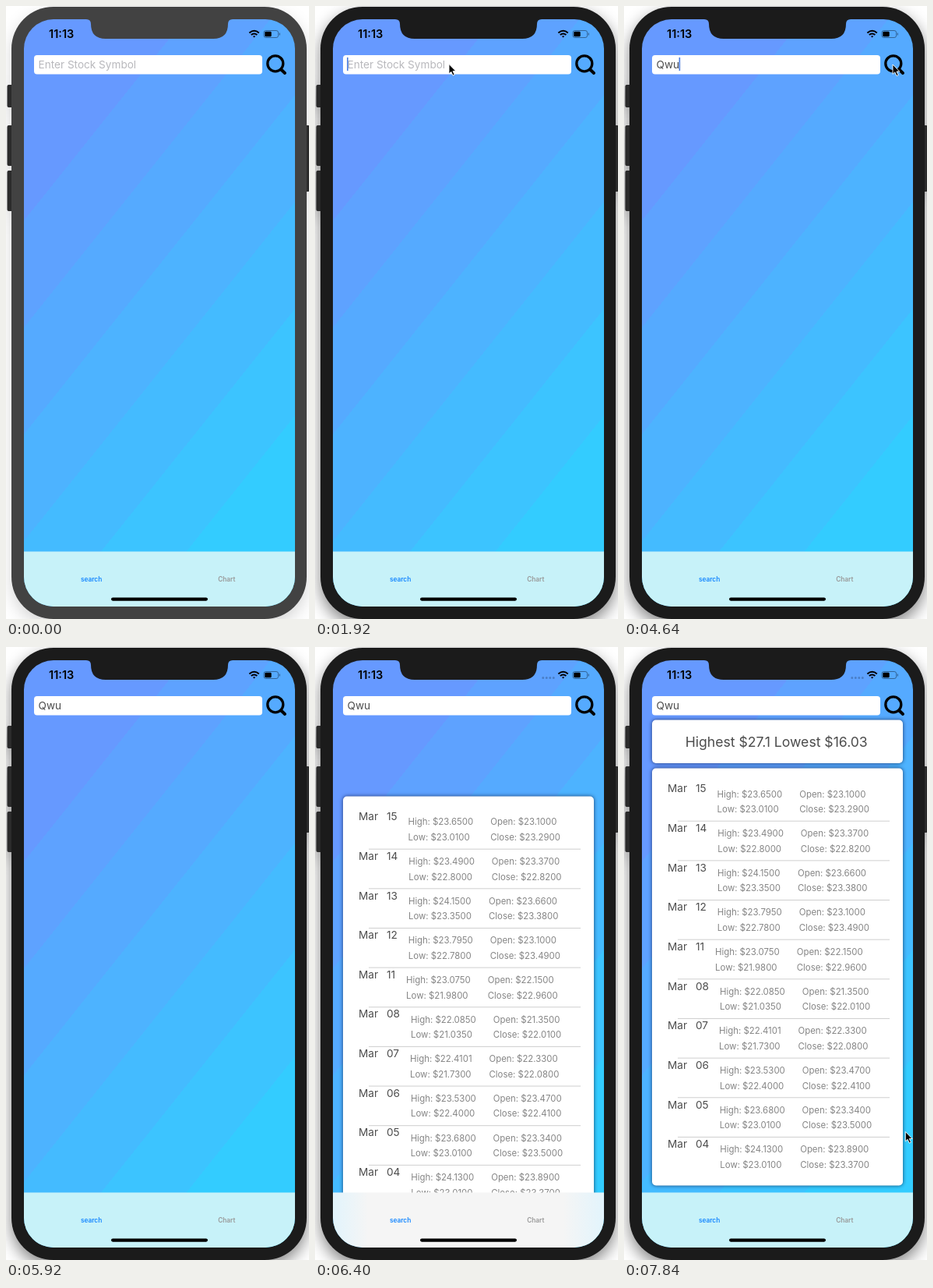
Recreate the animation shown at these times as an HTML page. Size 389 px wide and 786 px high, loop 8 s.

```html
<!DOCTYPE html>
<html lang="en">
<head>
<meta charset="utf-8">
<title>Stock search</title>
<style>
  html, body { margin: 0; height: 100%; overflow: hidden; background: #fff; }
  svg { display: block; width: 100vw; height: 100vh; }
  text { font-family: Inter, Roboto, sans-serif; font-size: 13.6px; fill: #4c4c4c; }
  .price { font-size: 11.4px; fill: #858585; }
  .tab { font-size: 8.3px; font-weight: 600; text-anchor: middle; }
  .card { fill: #fff; filter: drop-shadow(0 0 2.5px rgba(0, 10, 50, .7)); }
</style>
</head>
<body>
<svg viewBox="0 0 389 786">
  <defs>
    <clipPath id="screen"><rect x="23" y="17" width="348" height="753" rx="38"/></clipPath>
    <linearGradient id="sky" gradientUnits="userSpaceOnUse" x2="487.8" y2="390.2"/>
    <linearGradient id="frost">
      <stop offset="0" stop-color="#e2f4fc"/><stop offset=".13" stop-color="#f5f5f5"/>
      <stop offset=".85" stop-color="#f5f5f5"/><stop offset="1" stop-color="#e2f4fc"/>
    </linearGradient>
  </defs>

  <g id="phone">
    <g fill="#2b2b2b">
      <rect x="1.5" y="101" width="8" height="29" rx="2"/>
      <rect x="1.5" y="153" width="8" height="52" rx="2"/>
      <rect x="1.5" y="211" width="8" height="52" rx="2"/>
      <rect x="382" y="153" width="8" height="85" rx="2"/>
    </g>
    <rect id="body" x="7" y="1" width="379" height="785" rx="54"/>
  </g>

  <g clip-path="url(#screen)">
    <rect x="23" y="17" width="348" height="753" fill="url(#sky)"/>

    <rect x="36" y="63" width="293" height="24.5" rx="4" fill="#fff"/>
    <text id="query" x="41.5" y="79.7"></text>
    <rect id="caret" y="66" width="1.6" height="17" fill="#4b7de0"/>
    <g fill="none" stroke="#000">
      <circle cx="345.8" cy="73.8" r="10" stroke-width="3.3"/>
      <path d="M353 81.3L358 86" stroke-width="4" stroke-linecap="round"/>
    </g>

    <g id="summary">
      <rect class="card" x="36" y="93.5" width="322" height="55.5" rx="5"/>
      <text x="195.7" y="128" text-anchor="middle" style="font-size:17.6px">Highest $27.1 Lowest $16.03</text>
    </g>
    <g id="list"><rect class="card" x="36" y="155.5" width="322" height="535" rx="5"/></g>

    <rect id="bar" x="23" y="699.5" width="348" height="71"/>
    <text class="tab" x="109.6" y="738" style="fill:#1687ff">search</text>
    <text class="tab" x="283.3" y="738" style="fill:#999">Chart</text>
    <rect x="135" y="758.5" width="124" height="4.2" rx="2.1"/>

    <text x="55" y="41" style="font-size:14.5px;font-weight:600;fill:#000">11:13</text>
    <path id="dots" d="M292.8 39.5H307" stroke="#000" stroke-width="3" stroke-linecap="round"
      stroke-dasharray="0 4.5" opacity=".22"/>
    <g fill="none" stroke="#000" stroke-width="2">
      <path d="M312.4 34.6Q318.6 29 324.8 34.6M314.8 37.1Q318.6 33.8 322.4 37.1"/>
      <path d="M318.6 40.6L316.9 38.8Q318.6 37.6 320.3 38.8Z" fill="#000" stroke="none"/>
      <rect x="331" y="31.5" width="18.6" height="9" rx="2.6" stroke-width="1" opacity=".4"/>
      <rect x="332.3" y="32.8" width="8.4" height="6.4" rx="1.2" fill="#000" stroke="none"/>
      <path d="M351.3 34.5V37.5" stroke-width="1.2" opacity=".4"/>
    </g>
  </g>
  <path id="notch" d="M103 16H291V17Q285 17 285 23Q285 42 266 42H128Q109 42 109 23Q109 17 103 17Z"/>
  <path id="pointer" d="M0 0V12.4L2.8 9.8L5 14.6L7.2 13.6L5 9H8.8Z" stroke="#fff" stroke-width=".9"/>
</svg>

<script>
const LOOP = 8000, STEP = 160;
const QUERY = "Qwu", TYPING_START = 2400, KEY_INTERVAL = 400;

// High, low, open and close of each trading day, newest first
const QUOTES = `23.65 23.01 23.1 23.29
23.49 22.8 23.37 22.82
24.15 23.35 23.66 23.38
23.795 22.78 23.1 23.49
23.075 21.98 22.15 22.96
22.085 21.035 21.35 22.01
22.4101 21.73 22.33 22.08
23.53 22.4 23.47 22.41
23.68 23.01 23.34 23.5
24.13 23.01 23.89 23.37`.split("\n");

const FIELD = [172, 74.5], LENS = [345, 75], OFF_RIGHT = [389, 420], LIST_EDGE = [361.3, 621.5];

const $ = id => document.getElementById(id);
const clamp = v => Math.max(0, Math.min(1, v));
const mix = (a, b, k) => a + (b - a) * k;
const progress = (t, start, duration) => clamp((t - start) / duration);
const easeInOut = k => k < .5 ? 2 * k * k : 1 - 2 * (1 - k) ** 2;

function add(parent, tag, attrs, content = "") {
  const node = document.createElementNS("http://www.w3.org/2000/svg", tag);
  for (const key in attrs) node.setAttribute(key, attrs[key]);
  node.textContent = content;
  parent.append(node);
  return node;
}

// Seven flat diagonal bands at an even spacing
function buildSky() {
  const bands = 7;
  for (let i = 0; i < bands; i++) {
    const k = i / (bands - 1);
    const color = `rgb(${mix(102, 51, k)},${mix(153, 204, k)},255)`;
    for (const edge of [i, i + 1])
      add($("sky"), "stop", { offset: .167 + .137 * edge, "stop-color": color });
  }
}

// Returns where the written text ends
function write(x, y, content, type = "") {
  const node = add($("list"), "text", { x, y, class: type }, content);
  return x + node.getComputedTextLength();
}

// Each column starts a fixed gap after the widest text before it
function buildList() {
  QUOTES.forEach((quote, i) => {
    const [high, low, open, close] = quote.split(" ").map(v => Number(v).toFixed(4));
    const day = 15 - i - (i > 4 ? 2 : 0); // skips the weekend
    const y = 186.3 + i * 50.65, upper = y + 6.2, lower = y + 25.7;
    write(56, y, "Mar");
    const left = write(92, y, String(day).padStart(2, "0")) + 14;
    const right = 22 + Math.max(
      write(left, upper, `High: $${high}`, "price"),
      write(left, lower, `Low: $${low}`, "price"));
    write(right, upper, `Open: $${open}`, "price");
    write(right, lower, `Close: $${close}`, "price");
    if (i < QUOTES.length - 1)
      add($("list"), "rect", { x: 69, y: y + 36.4, width: 272, height: 1, fill: "#cfcfcf" });
  });
}

function pointerAt(t) {
  const glide = (from, to, start, duration) => {
    const k = progress(t, start, duration);
    return from.map((v, i) => mix(v, to[i], k));
  };
  if (t >= 480 && t < TYPING_START) return glide(OFF_RIGHT, FIELD, 320, 960);
  if (t >= 3520 && t < 5760) return glide(FIELD, LENS, 3410, 320);
  if (t >= 7840) return LIST_EDGE;
  return null;
}

function show(id, visible) {
  $(id).style.display = visible ? "" : "none";
}

function draw(t) {
  const active = t >= 320;
  $("body").style.fill = $("notch").style.fill = active ? "#1b1b1b" : "#424242";
  $("phone").style.filter = `drop-shadow(0 8px 10px rgba(0,0,0,${active ? .48 : .16}))`;

  const typed = QUERY.slice(0, Math.max(0, Math.floor((t - TYPING_START) / KEY_INTERVAL) + 1));
  const query = $("query");
  query.textContent = typed || "Enter Stock Symbol";
  query.style.fill = typed ? "#4c4c4c" : "#b8b8bc";
  $("caret").setAttribute("x", 41 + (typed ? query.getComputedTextLength() : 0));
  show("caret", t >= 1440 && t < 5600);

  const loaded = t >= 6240;
  const offset = mix(622, 0, easeInOut(progress(t, 5985, 500)));
  show("list", loaded);
  show("dots", loaded);
  $("list").setAttribute("transform", `translate(0 ${offset})`);
  $("bar").setAttribute("fill", loaded && offset > 9 ? "url(#frost)" : "#c7f2f9");
  $("summary").setAttribute("opacity", progress(t, 7040, 480));

  const pointer = pointerAt(t);
  show("pointer", pointer);
  if (pointer) $("pointer").setAttribute("transform", `translate(${pointer})`);
}

function tick() {
  const t = performance.now() % LOOP;
  draw(Math.floor(t / STEP) * STEP);
  requestAnimationFrame(tick);
}

buildSky();
buildList();
tick();
</script>
</body>
</html>
```
